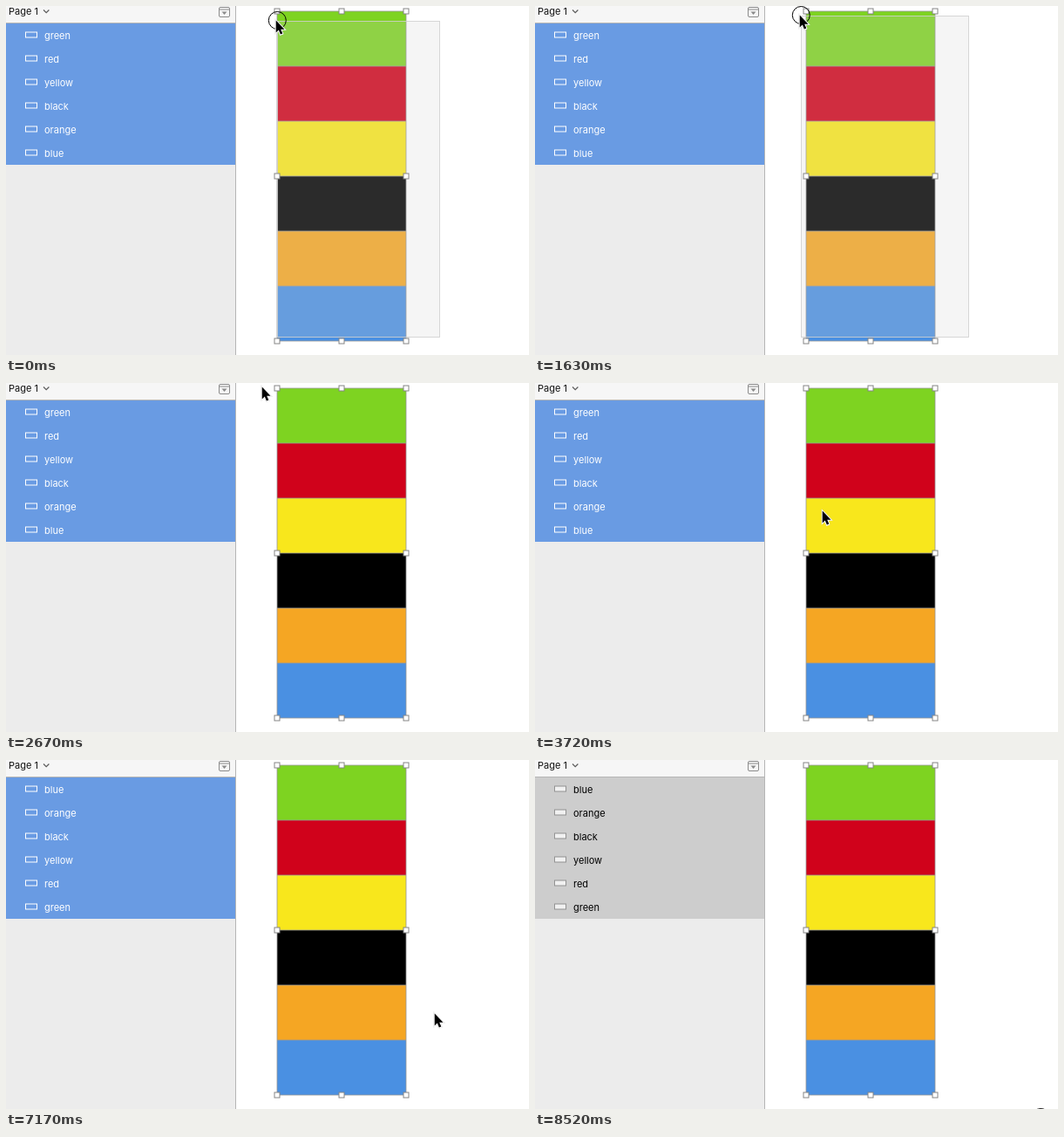
An HTML page that plays this animation: 600x400 px, repeating every 8620 ms.

```html
<!DOCTYPE html>
<html lang="en">
<head>
<meta charset="utf-8">
<title>Reverse layer order</title>
<style>
  html, body { margin: 0; width: 100%; height: 100%; overflow: hidden; background: #fff; }
  svg { display: block; width: 600px; height: 400px; }
  text { font: 11px Inter, Roboto, sans-serif; }
  #rows rect { fill: none; stroke: #fff; }
  #rows text { fill: #fff; }
  #rows .back { fill: #699be3; stroke: none; }
  #rows.idle .back { fill: #cdcdcd; }
  #rows.idle .icon { fill: #f1f1f1; stroke: #929292; }
  #rows.idle text { fill: #000; }
  #outline { fill: none; stroke: #979797; stroke-opacity: .8; }
  #handles rect { fill: #fff; stroke: #858585; }
  #marquee { fill: #cfcfcf; fill-opacity: .208; stroke: #d0d0d0; stroke-opacity: .85; }
  #ring { fill: none; stroke: #000; }
  #arrow { stroke: #fff; stroke-width: 2; paint-order: stroke; filter: drop-shadow(0 .8px .7px rgba(0, 0, 0, .3)); }
</style>
</head>
<body>
<svg viewBox="0 0 600 400">
  <rect width="263" height="400" fill="#ececec"/>
  <rect width="263" height="19" fill="#f6f6f6"/>
  <rect y="19" width="263" height="1" fill="#b5b5b5"/>
  <text x="3" y="10" fill="#111">Page 1</text>
  <path d="M43 4.5l3.2 3.2 3.2-3.2" fill="none" stroke="#5c5c5c" stroke-width="1.2"/>
  <g stroke="#8b8b8b" fill="none">
    <rect x="244.5" y="1.5" width="12" height="11" rx="1.5"/>
    <path d="M245 4h11"/>
    <path d="M247.5 6.5h6l-3 3.5z" fill="#8b8b8b" stroke="none"/>
  </g>
  <g id="rows"><rect class="back" y="20" width="263" height="162"/></g>
  <rect x="263" width="1" height="400" fill="#b5b5b5"/>
  <g id="bars"></g>
  <path id="outline"/>
  <rect id="marquee"/>
  <g id="handles"></g>
  <circle id="ring" r="10"/>
  <path id="arrow" d="M0 0V13.9L3.1 11 5.2 16 7.6 15 5.5 10.1H9.8Z"/>
</svg>
<script>
  const LOOP = 8620, RELEASE = 2670, REVERSE = 7170, CLICK = 8520;
  const LEFT = 311, TOP = 6, WIDTH = 148, BAR = 63, ROW = 27;
  const layers = [
    ['green', '#7ed321'], ['red', '#d0021b'], ['yellow', '#f8e71c'],
    ['black', '#000'], ['orange', '#f5a623'], ['blue', '#4a90e2']
  ];
  const names = layers.map(layer => layer[0]);

  // Pointer strokes: the first hop lands at `from`, the last at `to`.
  const origin = { x: 311, y: 17 };
  const strokes = [
    { from: 150, to: 300, hops: 2, x: 312, y: 18 },
    { from: 900, to: 2070, hops: 9, x: 294, y: 1 },
    { from: RELEASE, to: RELEASE, hops: 1, x: 295, y: 5 },
    { from: 2820, to: 3120, hops: 3, x: 329, y: 146 },
    { from: 3720, to: 3720, hops: 1, x: 331, y: 147 },
    { from: 4470, to: 4920, hops: 4, x: 493, y: 291 },
    { from: 7920, to: 8220, hops: 3, x: 552, y: 412 },
    { from: CLICK, to: CLICK, hops: 1, x: 580, y: 410 }
  ];
  const speedUp = p => p ** 1.6;

  function pointer(t) {
    let { x, y } = origin;
    for (const s of strokes) {
      if (t < s.from) break;
      const gap = (s.to - s.from) / (s.hops - 1) || 1;
      const hop = Math.min(s.hops, 1 + Math.floor((t - s.from) / gap));
      const p = speedUp(hop / s.hops);
      x = Math.round(x + (s.x - x) * p);
      y = Math.round(y + (s.y - y) * p);
    }
    return { x, y };
  }

  const $ = id => document.getElementById(id);
  function set(node, attrs) {
    for (const key in attrs) node.setAttribute(key, attrs[key]);
    return node;
  }
  function add(parent, tag, attrs) {
    const node = document.createElementNS('http://www.w3.org/2000/svg', tag);
    return parent.appendChild(set(node, attrs));
  }
  const show = on => on ? 'visible' : 'hidden';

  const rows = $('rows'), marquee = $('marquee'), ring = $('ring'), arrow = $('arrow');
  let edges = `M${LEFT} ${TOP}h${WIDTH}v${BAR * 6}h${-WIDTH}z`;

  const labels = layers.map(([, color], i) => {
    const y = TOP + i * BAR;
    add($('bars'), 'rect', { x: LEFT, y, width: WIDTH, height: BAR, fill: color });
    if (i) edges += `M${LEFT} ${y}h${WIDTH}`;
    add(rows, 'rect', { class: 'icon', x: 22.5, y: 30 + i * ROW, width: 13, height: 6 });
    return add(rows, 'text', { x: 44, y: 38 + i * ROW });
  });
  set($('outline'), { d: edges });

  for (const v of [0, .5, 1])
    for (const u of [0, .5, 1])
      if (u !== .5 || v !== .5)
        add($('handles'), 'rect', {
          x: LEFT + u * WIDTH - 3, y: TOP + v * BAR * 6 - 3, width: 6, height: 6
        });

  function draw(t) {
    const { x, y } = pointer(t);
    const dragging = t < RELEASE, clicked = t >= CLICK;

    labels.forEach((label, i) => {
      label.textContent = names[t < REVERSE ? i : names.length - 1 - i];
    });
    rows.classList.toggle('idle', clicked);

    set(marquee, {
      x: x + .5, y: y + .5, width: 497 - x, height: 379 - y, visibility: show(dragging)
    });
    set(ring, { cx: x + .3, cy: y - .5, visibility: show(dragging || clicked) });
    set(arrow, { transform: `translate(${x - 1.3} ${y - .4})` });
  }

  const start = performance.now();
  function tick() {
    draw((performance.now() - start) % LOOP);
    requestAnimationFrame(tick);
  }
  tick();
</script>
</body>
</html>
```
